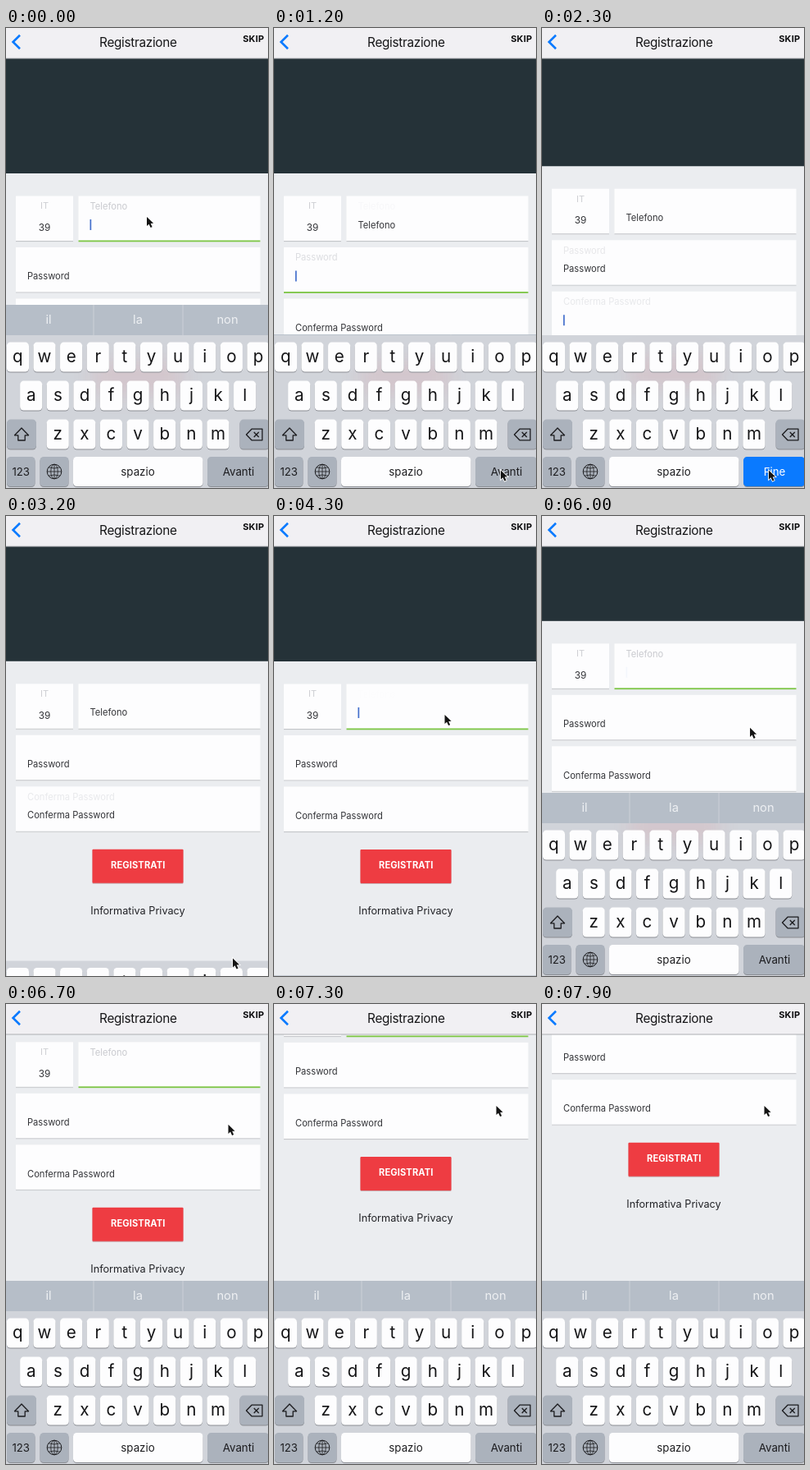
Recreate the animation shown at these times as an HTML page with a canvas. Size 320 by 560 pixels, loop 8000 ms.

```html
<!DOCTYPE html>
<html lang="it">
<head>
<meta charset="utf-8">
<title>Registrazione</title>
<style>
  html, body { margin: 0; width: 100%; height: 100%; overflow: hidden; background: #ebedf0; }
  canvas { display: block; width: 320px; height: 560px; }
</style>
</head>
<body>
<canvas id="stage"></canvas>
<script>
const W = 320, H = 560, LOOP = 8000;
const canvas = document.getElementById('stage');
const ctx = canvas.getContext('2d');
const dpr = window.devicePixelRatio || 1;
canvas.width = W * dpr;
canvas.height = H * dpr;

// Moments at which the focus changes
const TO_PASS = 890, TO_CONF = 2100, DISMISS = 2985, TO_PHONE = 4296, RELEASE = 6860;
const FIELDS = [
  { label: 'Telefono', x: 88.5, y: 204.5, w: 222, focus: [[-800, TO_PASS], [TO_PHONE, 1e6]] },
  { label: 'Password', x: 12, y: 267, w: 298.5, focus: [[TO_PASS, TO_CONF]] },
  { label: 'Conferma Password', x: 12, y: 329.5, w: 298.5, focus: [[TO_CONF, DISMISS]] }
];
const INK = '#1c1c1f', KEY = '#fdfdfe', KEY_GRAY = '#abb2bc', BLUE = '#0a7aff';

const clamp = v => Math.max(0, Math.min(1, v));
const smooth = v => { v = clamp(v); return v * v * (3 - 2 * v); };

// Critically damped spring from 0 to 1
function spring(ms) {
  if (ms <= 0) return 0;
  const k = ms * 0.018;
  return 1 - (1 + k) * Math.exp(-k);
}

// Linear interpolation through [time, value, value...] rows
function track(rows, t) {
  if (t <= rows[0][0]) return rows[0].slice(1);
  for (let i = 1; i < rows.length; i++) {
    const a = rows[i - 1], b = rows[i];
    if (t < b[0]) {
      const u = (t - a[0]) / (b[0] - a[0]);
      return a.slice(1).map((v, j) => v + (b[j + 1] - v) * u);
    }
  }
  return rows[rows.length - 1].slice(1);
}

const DRAG = [[5695, 0], [6000, 49], [6500, 130], [6700, 158], [RELEASE, 181]];

function scrollAt(t) {
  if (t < DRAG[0][0]) return 10 * (spring(t - TO_CONF) - spring(t - DISMISS + 100));
  if (t < RELEASE) return track(DRAG, t)[0];
  return 181 + 62.5 * (1 - Math.exp((RELEASE - t) / 450));
}

function pointerAt(t) {
  const move = (a, b, from, to) => {
    const u = smooth((t - from) / (to - from));
    return [a[0] + (b[0] - a[0]) * u, a[1] + (b[1] - a[1]) * u];
  };
  if (t < 2000) return move([172, 230], [277, 538.5], 30, 710);
  if (t < 4500) return move([277, 538.5], [208.5, 242], 3420, 4020);
  if (t < 5695) return move([208.5, 242], [252, 307], 5130, 5550);
  return track([[5695, 252, 307], [6000, 254, 258], [6500, 268, 176],
    [6700, 271.5, 147], [RELEASE, 271.5, 124]], t);
}

function caretAlpha(age) {
  if (age < 500) return 1;
  const u = (age - 700 + 1000) % 1000;
  return Math.min(clamp(u / 100), clamp((500 - u) / 100));
}

function rect(x, y, w, h, color) {
  ctx.fillStyle = color;
  ctx.fillRect(x, y, w, h);
}

function rounded(x, y, w, h, r, color) {
  ctx.fillStyle = color;
  ctx.beginPath();
  ctx.roundRect(x, y, w, h, r);
  ctx.fill();
}

function text(str, x, y, size, color, opt = {}) {
  ctx.font = `${opt.weight || 400} ${size}px Inter, "Open Sans", sans-serif`;
  ctx.letterSpacing = (opt.spacing || 0) + 'px';
  ctx.textAlign = opt.align || 'center';
  ctx.fillStyle = color;
  ctx.fillText(str, x, y);
}

function path(points, close) {
  ctx.beginPath();
  points.forEach(([x, y]) => ctx.lineTo(x, y));
  if (close) ctx.closePath();
}

function stroke(color, width) {
  ctx.strokeStyle = color;
  ctx.lineWidth = width;
  ctx.stroke();
}

function box(x, y, w, focused) {
  rect(x, y, w, 55, '#fdfdfe');
  if (focused) rect(x, y + 54, w, 1.8, '#7cc544');
  else {
    rect(x, y + 54.5, w, 1, '#c3c5c9');
    rect(x, y + 55.5, w, 0.5, '#e0e2e5');
  }
}

function drawField(f, t) {
  const active = f.focus.find(([a, b]) => t >= a && t < b);
  const tx = f.x + 14;
  const left = { align: 'left' };
  box(f.x, f.y, f.w, active);
  ctx.globalAlpha = Math.max(...f.focus.map(([a, b]) =>
    clamp((t - a) / 500) * (1 - clamp((t - b) / 350))));
  text(f.label, tx, f.y + 16.4, 11.15, '#c9cacf', left);
  ctx.globalAlpha = 1;
  if (active) {
    ctx.globalAlpha = caretAlpha(t - active[0]);
    rect(tx, f.y + 28.5, 1.7, 13, '#4470cc');
    ctx.globalAlpha = 1;
  } else {
    text(f.label, tx, f.y + 39.2, 11.15, '#333438', left);
  }
}

function drawForm(t, scroll) {
  ctx.save();
  ctx.translate(0, -scroll);
  rect(0, 37, W, 140, '#253238');
  box(12, 204.5, 70, false);
  text('IT', 47, 220.4, 11, '#cfd0d4');
  text('39', 47, 247, 11.8, '#333438');
  FIELDS.forEach(f => drawField(f, t));
  rounded(105.5, 406.5, 111, 41.5, 1, '#c9a9ad');
  rounded(105.5, 406, 111, 41, 1, '#ee3c42');
  text('REGISTRATI', 161.3, 429, 11.1, '#fff', { weight: 700, spacing: 0.15 });
  text('Informativa Privacy', 161, 485, 12.7, '#222327');
  ctx.restore();
}

function drawNav() {
  rect(0, 0, W, 37, '#f1f0f3');
  rect(0, 36.5, W, 1, '#aeb0b4');
  ctx.lineCap = 'butt';
  ctx.lineJoin = 'miter';
  path([[17, 8.8], [8.6, 17], [17, 25.2]]);
  stroke(BLUE, 2.6);
  text('Registrazione', 161.3, 23.3, 15.3, '#161618', { spacing: -0.3 });
  text('SKIP', 302.2, 17, 11, '#0c0c0e', { weight: 700, spacing: 0.2 });
}

function key(x, y, w, color) {
  rounded(x, y + 1, w, 36, 4.5, '#8b8e94');
  rounded(x, y, w, 36, 4.5, color);
}

function letterRow(letters, cx, y) {
  [...letters].forEach((c, i) => {
    const x = cx + i * 32.62;
    key(x - 13.6, y, 27.2, KEY);
    text(c, x, y + 24.2, 20.6, '#151517');
  });
}

function drawShift(x, y) {
  path([[x, y - 8], [x + 8.5, y + 0.8], [x + 4.2, y + 0.8], [x + 4.2, y + 7],
    [x - 4.2, y + 7], [x - 4.2, y + 0.8], [x - 8.5, y + 0.8]], true);
  stroke(INK, 1.3);
}

function drawBackspace(x, y) {
  path([[x - 10, y], [x - 3.5, y - 6.8], [x + 9.5, y - 6.8],
    [x + 9.5, y + 6.8], [x - 3.5, y + 6.8]], true);
  stroke(INK, 1.3);
  for (const s of [-3, 3]) {
    path([[x - 0.7, y - s], [x + 5.3, y + s]]);
    stroke(INK, 1.3);
  }
}

function drawGlobe(x, y) {
  const r = 8.8;
  ctx.beginPath();
  ctx.arc(x, y, r, 0, 7);
  stroke(INK, 1);
  ctx.beginPath();
  ctx.ellipse(x, y, r * 0.48, r, 0, 0, 7);
  stroke(INK, 0.8);
  ctx.beginPath();
  ctx.moveTo(x, y - r); ctx.lineTo(x, y + r);
  ctx.moveTo(x - r, y); ctx.lineTo(x + r, y);
  for (const s of [-1, 1]) {
    ctx.moveTo(x - 7, y + s * 5.2);
    ctx.quadraticCurveTo(x, y + s * 2.8, x + 7, y + s * 5.2);
  }
  stroke(INK, 0.8);
}

function drawKeyboard(t, scroll) {
  let drop = 0, bar = 37;
  if (t < TO_PHONE) {
    bar = 37 * (1 - spring(t - TO_PASS));
    drop = 186 * spring(t - DISMISS);
  } else {
    drop = 223 * (1 - spring(t - TO_PHONE));
  }
  const top = 374 + drop;
  if (top - bar >= H - 0.5) return;

  ctx.save();
  ctx.beginPath();
  ctx.rect(0, top, W, H);
  ctx.clip();
  rect(0, top, W, 190, '#d1d4da');
  // The red button glows through the translucent panel
  ctx.filter = `blur(${12 * dpr}px)`;
  rect(106, 406 - scroll, 110, 41, 'rgba(238,60,66,0.09)');
  ctx.restore();

  ctx.save();
  if (bar > 0.3) {
    ctx.beginPath();
    ctx.rect(0, top - bar, W, bar);
    ctx.save();
    ctx.clip();
    rect(0, top - bar, W, bar, '#b6bec8');
    for (const x of [106.5, 215.5]) rect(x, top - bar, 1, bar, '#cbd0d7');
    const words = [['il', 52], ['la', 161], ['non', 270.5]];
    words.forEach(([w, x]) => text(w, x, top - bar + 22.6, 14.7, '#eef0f3'));
    ctx.restore();
  }

  ctx.translate(0, drop);
  ctx.lineJoin = 'round';
  letterRow('qwertyuiop', 14.4, 382.6);
  letterRow('asdfghjkl', 30.7, 429.6);
  letterRow('zxcvbnm', 63.2, 476.6);
  key(1, 476.6, 36, KEY_GRAY);
  drawShift(19, 495);
  key(285.5, 476.6, 36, KEY_GRAY);
  drawBackspace(303.5, 495);
  key(1, 522, 34.5, KEY_GRAY);
  text('123', 18.2, 545, 13.2, INK);
  key(41.5, 522, 35, KEY_GRAY);
  drawGlobe(59, 540);
  key(82, 522, 158.5, KEY);
  text('spazio', 161, 544.5, 13.3, INK);
  const last = t >= TO_CONF && t < TO_PHONE;
  key(246, 522, 75, last ? BLUE : KEY_GRAY);
  text(last ? 'Fine' : 'Avanti', 284, 544.5, 13.3, last ? '#fff' : INK);
  ctx.restore();
}

function drawPointer([x, y]) {
  ctx.save();
  ctx.translate(x, y);
  ctx.scale(0.92, 0.92);
  ctx.lineJoin = 'miter';
  path([[0, 0], [0, 12], [2.8, 9.5], [5, 14.2], [7.2, 13.2], [5.1, 8.7], [8.8, 8.5]], true);
  stroke('#fff', 1.8);
  ctx.fillStyle = '#141414';
  ctx.fill();
  ctx.restore();
}

function draw(t) {
  ctx.setTransform(dpr, 0, 0, dpr, 0, 0);
  rect(0, 0, W, H, '#ebedf0');
  const scroll = scrollAt(t);
  drawForm(t, scroll);
  drawNav();
  drawKeyboard(t, scroll);
  drawPointer(pointerAt(t));
}

const start = performance.now();
function tick() {
  draw((performance.now() - start) % LOOP);
  requestAnimationFrame(tick);
}
tick();
</script>
</body>
</html>
```
